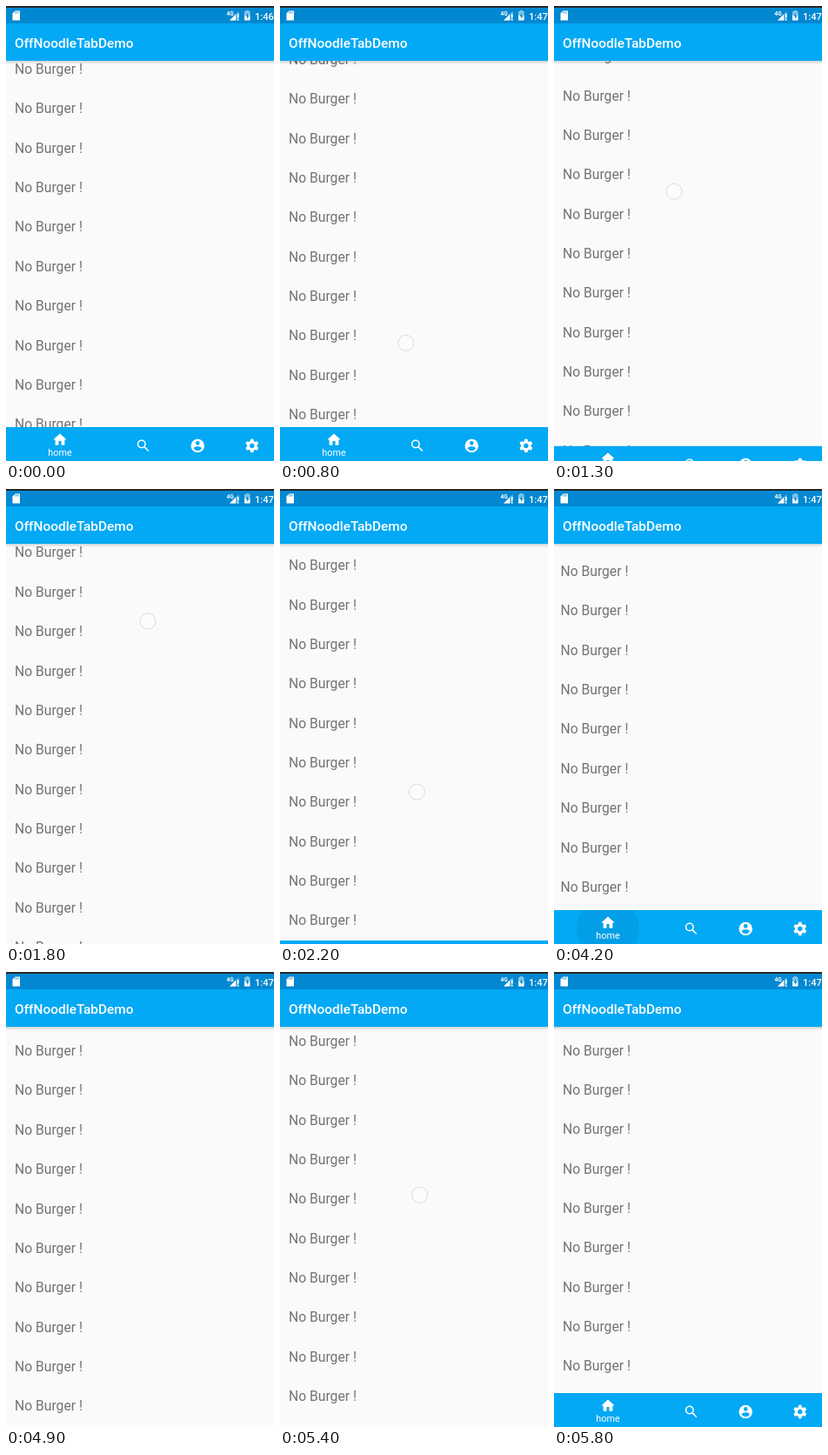
Write an HTML page that moves like this. It is 308 by 523 pixels and loops after 6300 ms.

```html
<!DOCTYPE html>
<html lang="en">
<head>
<meta charset="utf-8">
<title>Tab bar demo</title>
<style>
html, body { margin: 0; width: 100%; height: 100%; overflow: hidden; background: #fafafa; }
svg { display: block; font-family: Roboto, sans-serif; }
.white { fill: #fff; }
.row { font-size: 15.7px; fill: #737373; }
.page { font-size: 30.8px; fill: #757575; text-anchor: middle; }
.label { font-size: 10.8px; fill: #fff; text-anchor: middle; }
</style>
</head>
<body>
<svg width="308" height="523" viewBox="0 0 308 523">
  <defs>
    <linearGradient id="shade" x2="0" y2="1">
      <stop stop-color="#000" stop-opacity=".16"/>
      <stop offset="1" stop-color="#000" stop-opacity="0"/>
    </linearGradient>
    <clipPath id="barClip"><rect y="484" width="308" height="39"/></clipPath>
  </defs>
  <rect width="308" height="523" fill="#fafafa"/>
  <g id="homePage"><g id="list"></g></g>
  <g id="searchPage"><text class="page" x="156.2" y="306.6">search</text></g>
  <g id="accountPage"><text class="page" x="156.2" y="306.6">account</text></g>

  <g id="nav">
    <rect y="484" width="308" height="39" fill="#03a9f4"/>
    <g clip-path="url(#barClip)"><circle id="ripple" cy="505" fill="#000" fill-opacity=".06"/></g>
    <g id="tabs"></g>
  </g>

  <rect y="63" width="308" height="4" fill="url(#shade)"/>
  <rect y="20" width="308" height="43" fill="#03a9f4"/>
  <rect width="308" height="20" fill="#0288d1"/>
  <rect width="308" height="2" fill="#262626"/>
  <text class="white" x="10" y="48" font-size="15.4" font-weight="500">OffNoodleTabDemo</text>

  <g class="white">
    <path d="M10.5 5.5h5.5v11h-8.5v-8z"/>
    <path d="M10.7 6.5v2M12.4 6.5v2M14.1 6.5v2" stroke="#0288d1" stroke-width=".8"/>
    <text x="253.5" y="10.5" font-size="6.5" font-weight="700">4G</text>
    <path d="M257 16.5l10.5-10.5v10.5z" opacity=".4"/>
    <path d="M257 16.5l7-7v7zM266 9h1.5v4.500h-1.5zM266 15h1.5v1.5h-1.5z"/>
    <path d="M276 6v-1h3v1h1.500v4.500h-6.500v-4.500z" opacity=".5"/>
    <path d="M274 10.500h6.500v6h-6.500z"/>
    <path d="M278 8l-2.500 4h1.600v3l2.300-4h-1.500z" fill="#0288d1"/>
    <text id="clock" x="286" y="15.5" font-size="11" font-weight="500">1:46</text>
  </g>
  <circle id="finger" r="9" fill="#fff" fill-opacity=".45" stroke="#b9c3c9" stroke-opacity=".55"/>
</svg>
<script>
const LOOP = 6300, STEP = 100, PITCH = 45.35, FIRST_ROW = 72;
const BAR_HEIGHT = 39, BAR_TIME = 250;
const $ = id => document.getElementById(id);
const clamp = u => Math.min(1, Math.max(0, u));
const smooth = u => u * u * (3 - 2 * u);
const glide = u => Math.sin(u * Math.PI / 2);

// move: list travel; hold: time until the finger lifts; bar: 1 hides it, -1 shows it
const swipes = [
  { start: 400, span: 600, hold: 400, x: 175, y: 217, lean: -35, move: 196.65, bar: 0 },
  { start: 1100, span: 600, hold: 300, x: 138, y: 334, lean: 0, move: -241.6, bar: 1 },
  { start: 1800, span: 480, hold: 400, x: 163, y: 152, lean: -6, move: 203, bar: -1 },
  { start: 4500, span: 600, hold: 300, x: 165, y: 380, lean: 20, move: -161.7, bar: 1 },
  { start: 5200, span: 600, hold: 400, x: 163, y: 155, lean: -5, move: 202.55, bar: -1 }
];
const taps = [
  { start: 2800, span: 200, tab: 1 },
  { start: 3400, span: 300, tab: 2 },
  { start: 4000, span: 300, tab: 0 }
];

const teeth = [0, 60, 120, 180, 240, 300].map(a =>
  `<path d="M8.8 6.5L10 2h4l1.2 4.5z" transform="rotate(${a} 12 12)"/>`).join('');
const tabs = [
  { name: 'home', icon: '<path d="M10 20v-6h4v6h5v-8h3L12 3 2 12h3v8z"/>' },
  { name: 'search', icon: '<g fill="none" stroke="#fff" stroke-width="2">' +
    '<circle cx="9.5" cy="9.5" r="5.5"/><path d="M13.8 13.8l6 6"/></g>' },
  { name: 'account', icon: '<circle cx="12" cy="12" r="10"/><g fill="#03a9f4"><circle cx="12" cy="8" r="3"/>' +
    '<path d="M6 16c0-2 4-3.1 6-3.1s6 1.1 6 3.1a7.2 7.2 0 0 1-12 0z"/></g>' },
  { name: 'settings', icon: '<circle cx="12" cy="12" r="5.5" fill="none" stroke="#fff" stroke-width="4"/>' + teeth }
];

$('list').innerHTML = Array.from({ length: 12 }, (_, i) =>
  `<text class="row" x="10" y="${i * PITCH + 6.1}">No Burger !</text>`).join('');
$('tabs').innerHTML = tabs.map(tab =>
  `<g class="white">${tab.icon}</g><text class="label" y="517">${tab.name}</text>`).join('');
tabs.forEach((tab, i) => {
  tab.iconEl = $('tabs').children[2 * i];
  tab.labelEl = $('tabs').children[2 * i + 1];
  tab.page = $(tab.name + 'Page');
});

function set(el, attrs) {
  for (const name in attrs) el.setAttribute(name, attrs[name]);
}

const travel = (s, t) => s.move * glide(clamp((t - s.start) / s.span));
const sum = (items, f) => items.reduce((total, item) => total + f(item), 0);

function drawList(t) {
  const y = FIRST_ROW + sum(swipes, s => travel(s, t));
  set($('list'), { transform: `translate(0 ${(y % PITCH + PITCH) % PITCH})` });
}

function drawPages(t) {
  const i = taps.findLastIndex(tap => t >= tap.start);
  const tap = taps[i] || { start: -LOOP, span: 1, tab: 0 };
  const old = i > 0 ? taps[i - 1].tab : 0;
  const age = t - tap.start, mix = clamp(age / 200);
  const slide = Math.sign(tap.tab - old) * 23 * (1 - clamp(age / tap.span)) ** 2;

  let left = -2.5;
  tabs.forEach((tab, n) => {
    const on = n === tap.tab ? mix : n === old ? 1 - mix : 0;
    const width = 62.5 + 66.5 * on;
    tab.x = left + width / 2;
    left += width;
    set(tab.iconEl, { transform: `translate(${tab.x} ${505.5 - 7 * on}) scale(.77) translate(-12 -12)` });
    set(tab.labelEl, { x: tab.x, opacity: on });
    if (tab.page) set(tab.page, { opacity: on, transform: `translate(${n === tap.tab ? slide : 0} 0)` });
  });
  set($('ripple'), { cx: tabs[tap.tab].x, r: age < tap.span ? age * .18 : 0 });
}

function drawBar(t) {
  const drop = sum(swipes, s =>
    s.bar * smooth(clamp((t - s.start - (s.bar > 0 ? 65 : 350)) / BAR_TIME)));
  set($('nav'), { transform: `translate(0 ${BAR_HEIGHT * drop})` });
}

function drawFinger(t) {
  const s = swipes.find(s => t >= s.start && t <= s.start + s.hold);
  const tap = taps.find(tap => t >= tap.start && t < tap.start + STEP);
  set($('finger'), { visibility: s || tap ? 'visible' : 'hidden' });
  if (s) {
    const dy = travel(s, t);
    set($('finger'), { cx: s.x + s.lean * dy / s.move, cy: s.y + dy });
  } else if (tap) {
    set($('finger'), { cx: tabs[tap.tab].x + 3, cy: 508 });
  }
}

function draw(t) {
  drawList(t);
  drawPages(t);
  drawBar(t);
  drawFinger(t);
  $('clock').textContent = t < 700 ? '1:46' : '1:47';
}

const begin = performance.now();
function tick() {
  const t = (performance.now() - begin) % LOOP;
  draw(Math.floor(t / STEP) * STEP);
  requestAnimationFrame(tick);
}
tick();
</script>
</body>
</html>
```
